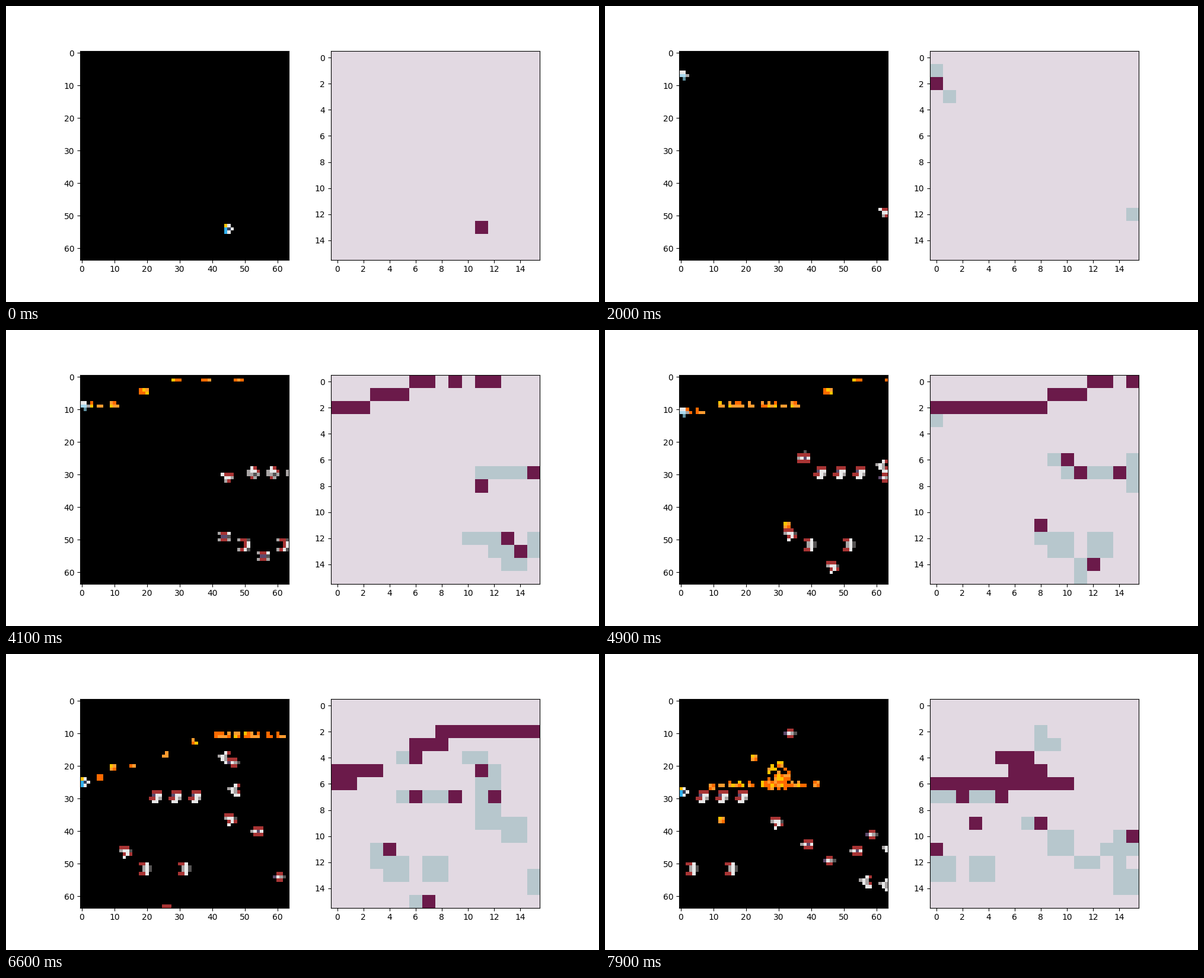
Animation, 1000 px wide and 500 px high, one loop 8 s. Source, as a matplotlib script:

```python
import numpy as np
import matplotlib.pyplot as plt
from matplotlib.animation import FuncAnimation

FRAMES, SIZE, CELL = 80, 64, 4
DRIFT, SHOT, AIMED = 1.2, 3.2, 2.0  # speeds in pixels per frame

COLORS = {
    "R": "#a83434", "W": "#e8e8e8", "G": "#a8a4a4", "D": "#555353",
    "P": "#5f4a6c", "B": "#30b0ee", "L": "#a8d8ee", "T": "#5f8f9f",
    "N": "#34405c", "Y": "#ffc400", "O": "#ff6a00", "A": "#ff9c30",
}
RGB = {k: np.array([int(c[i:i + 2], 16) for i in (1, 3, 5)]) / 255
       for k, c in COLORS.items()}
QUIET, LOW, SPIKE = [np.array(c) / 255 for c in
                     ((226, 217, 226), (183, 199, 205), (107, 26, 74))]
FIRE = list("OOOAAY")

SHIP = ["YW.", "BNW", "BW."], ["WW.", "LLG", ".T."]

# Two poses for each kind of enemy
PALE = ["..W.", "WWG.", ".GWD", "WGW."]
POSES = {
    "trio": ([".RRR", ".PWW", "RRWG", ".WW."],
             [".WR.", "GWWR", "GGDG", ".RG."]),
    "pair": (["RRW.", ".GWD", ".GWD", "RRW."],
             ["GRRD", "..RW", "..RW", "GRWD"]),
    "ring": ([".RR.", "PWGD", ".RR."], ["RRR.", "RWRD", "RRR."]),
    "disc": (["..D.", "RRRR", "GWPW", "RRRR"], ["WRRR", ".WWG", ".GR."]),
    "spin": (["RRR.", "GWWD", ".RWR", ".W.."], ["GRRW", ".PPD", "GRRG"]),
    "turn": ([".RRR", "GWPW", ".RRR"], PALE),
    "pale": (["..WR", "GWG.", ".WGR", "..WW"], PALE),
}


class Enemy:
    """Enters at the right edge and flies at constant speed on one heading."""

    def __init__(self, kind, born, y, vy=0.0, dies=FRAMES):
        self.kind, self.born, self.y, self.vy = kind, born, y, vy
        self.vx = -np.sqrt(DRIFT ** 2 - vy ** 2)
        self.dies = dies

    def at(self, n):
        t = n - self.born
        return SIZE + self.vx * t, self.y + self.vy * t


leader = Enemy("spin", 22.2, 49.8, -0.1)
raider = Enemy("pale", 45.3, 28, -0.57, 76)
pairs = [Enemy("pair", 27.3 + 10 * k, 50) for k in range(2)]
trio = [Enemy("trio", 29.8 + 5 * k, 28) for k in range(3)]
enemies = [
    Enemy("disc", 16.5, 51, -0.85, 65),
    leader,
    Enemy("spin", 32, 50.6, 0.37),
    raider,
    Enemy("ring", 46, 32.2, -0.7),
    Enemy("pale", 49.8, 28.4, -0.15, 77),
    Enemy("spin", 49, 33.5, 0.1),
    Enemy("turn", 55.5, 34.9, 0.35),
    Enemy("ring", 61.3, 55.5, -0.43),
    Enemy("turn", 67, 53.5, -0.7),
    Enemy("pale", 71, 55.6, -0.2),
    Enemy("ring", 72.3, 44, -0.6),
    Enemy("pale", 76.3, 55),
    Enemy("pale", 77.3, 44.6, -0.4),
] + pairs + trio
SNIPERS = (leader, 49), (pairs[1], 70), (raider, 71)

# Turning points of the ship: time and height
SHIP_Y = np.array([(0, 53), (20, 6), (24, 0), (33, 0), (39, 8), (46, 8),
                   (48, 10), (54, 10), (67, 25), (76, 25), (79, 27)]).T


def ship_at(n):
    return round(max(0, 44 - 2.25 * n)), round(np.interp(n, *SHIP_Y))


def fires(n):
    """Bursts, with single shots every third frame between them."""
    if 39 <= n < 55 or 67 <= n < 77:
        return n != 47
    return n >= 27 and n % 3 == (0 if n < 39 else 2)


def dot(img, x, y, key):
    if 0 <= x < SIZE and 0 <= y < SIZE:
        img[y, x] = RGB[key]


def stamp(img, rows, x, y):
    for j, row in enumerate(rows):
        for i, key in enumerate(row):
            if key != ".":
                dot(img, round(x) + i, round(y) + j, key)


def draw_shots(img, n):
    for start in filter(fires, range(n + 1)):
        age = n - start
        if 55 <= start < 67 and age > 11:  # these hit something
            continue
        rng = np.random.default_rng(start)
        x, y = int(2.6 + SHOT * age), ship_at(start)[1]
        for i in range(2 + (start % 3 == 0)):
            dot(img, x + i, y + 1, rng.choice(FIRE))
            if y > 2 and rng.random() < 0.6:
                dot(img, x + i, y, rng.choice(FIRE))


def draw_aimed(img, n):
    for enemy, start in SNIPERS:
        if n >= start:
            origin = np.array(enemy.at(start)) - (0, 2)
            way = np.array(ship_at(start)) - origin
            x, y = origin + way / np.hypot(*way) * AIMED * (n - start)
            stamp(img, ["YA", "AO"], x, y)


def draw_blast(img, n):
    rng = np.random.default_rng(n)
    radius = n - 74
    for y in range(19, 28):
        for x in range(27, 34):
            d = np.hypot(x - 30.3, (y - 24.3) * 0.9)
            if d < radius and rng.random() < 1.25 - d / 5:
                dot(img, x, y, rng.choice(FIRE))


def scene(n):
    img = np.zeros((SIZE, SIZE, 3))
    pose = n % 10 <= 5
    for e in enemies:
        if e.born <= n < e.dies:
            stamp(img, POSES[e.kind][pose], *e.at(n))
    draw_shots(img, n)
    if n >= 77:
        draw_blast(img, n)
    draw_aimed(img, n)
    stamp(img, SHIP[n % 11 >= 5], *ship_at(n))
    return img


def pool(a):
    k = SIZE // CELL
    return a.reshape(k, CELL, k, CELL).sum(axis=(1, 3))


def spike_maps(scenes):
    """Each 4x4 block fires on vivid colour or just after light leaves it."""
    heat = trace = 0
    maps = []
    for img in scenes:
        light = pool(img @ [0.3, 0.6, 0.1])
        heat = 0.5 * heat + pool(abs(img[..., 1] - img[..., 2]))
        past = 0.5 * trace
        trace = past + light
        out = np.tile(QUIET, light.shape + (1,))
        out[trace > 1] = LOW
        out[(heat > 0.8) | (past - light > 1.6)] = SPIKE
        maps.append(out)
    return maps


scenes = [scene(n) for n in range(FRAMES)]
maps = spike_maps(scenes)

fig, (left, right) = plt.subplots(1, 2, figsize=(10, 5), dpi=100)
view = left.imshow(scenes[0], interpolation="nearest")
units = right.imshow(maps[0], interpolation="nearest")


def update(n):
    view.set_data(scenes[n])
    units.set_data(maps[n])
    return view, units


anim = FuncAnimation(fig, update, frames=FRAMES, interval=100, repeat=True)
plt.show()
```
